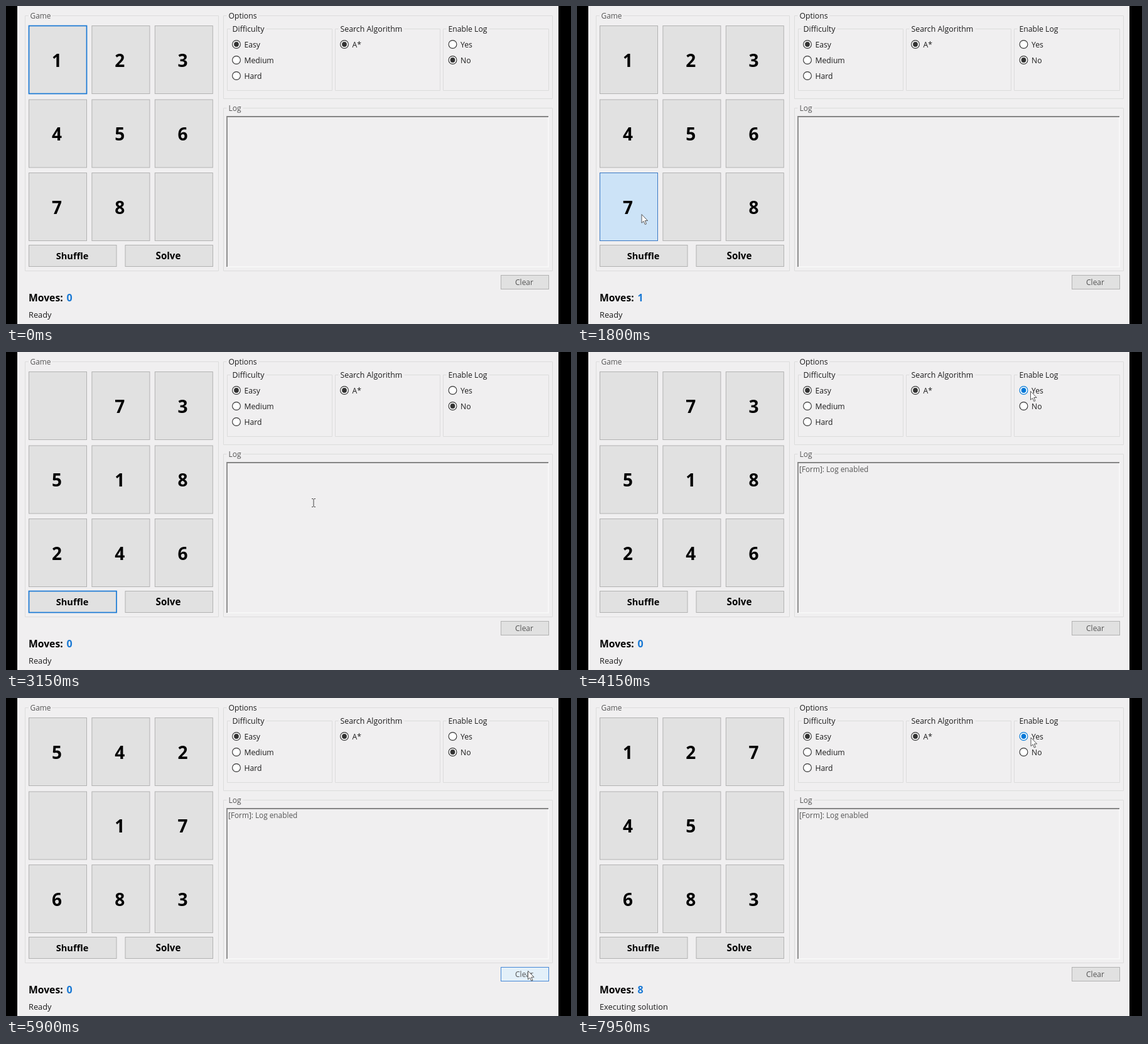
Write an HTML page that moves like this. It is 900 px wide and 506 px high and loops after 8000 ms.

```html
<!DOCTYPE html>
<html lang="en">
<head>
<meta charset="utf-8">
<title>Sliding puzzle</title>
<style>
  html, body { margin: 0; width: 100%; height: 100%; overflow: hidden; background: #000; }
  svg { display: block; width: 100%; height: 100%; }
  text { font-family: "Open Sans", "Noto Sans", sans-serif; fill: #1c1c1c; }
  .bold { font-weight: 700; fill: #000; }
  .soft { fill: #555; }
  .mid { text-anchor: middle; }
</style>
</head>
<body>
<svg id="stage" viewBox="0 0 900 506"></svg>
<script>
const LOOP = 8000, STEP = 50;
const BLUE = '#1878d4', INK = '#333';
const stage = document.getElementById('stage');

function el(tag, attrs, content) {
  const node = document.createElementNS('http://www.w3.org/2000/svg', tag);
  set(node, attrs);
  if (content !== undefined) node.textContent = content;
  return stage.appendChild(node);
}
function set(node, attrs) {
  for (const key in attrs) node.setAttribute(key, attrs[key]);
}
function label(x, y, size, content, cls = '') {
  return el('text', { x, y, 'font-size': size, class: cls }, content);
}
function group(x, y, right, bottom, title, titleWidth, size, cls) {
  const from = x + 5, to = x + 11 + titleWidth;
  el('path', {
    d: `M${from} ${y}H${x}V${bottom}H${right}V${y}H${to}`,
    fill: 'none', stroke: '#dcdcdc'
  });
  label(x + 8, y + 4.5, size, title, cls);
}

// Controls keep their box for hit tests
const controls = {};
function button(id, x, y, w, h, title, size, textX, baseline, cls) {
  const box = el('rect', { x: x + 0.5, y: y + 0.5, width: w - 1, height: h - 1 });
  const text = label(textX, baseline, size, title, cls + ' mid');
  controls[id] = { x, y, w, h, box, text };
}
function radio(id, x, y, title, size) {
  const ring = el('circle', { cx: x, cy: y, r: 6.4, 'stroke-width': 1.1 });
  const dot = el('circle', { cx: x, cy: y, r: 3.9 });
  label(x + 12.5, y + 4.6, size, title);
  controls[id] = { x: x - 8, y: y - 8, w: 42, h: 16, ring, dot };
}

el('rect', { width: 900, height: 506, fill: '#000' });
el('rect', { x: 18, width: 862, height: 506, fill: '#f0eff0' });

group(30.5, 15.5, 338.5, 421.5, 'Game', 32, 11.9, 'soft');
group(346.5, 15.5, 870.5, 147.5, 'Options', 45, 12.2, '');
group(352.5, 36.5, 519.5, 134.5, 'Difficulty', 51, 12.4, '');
group(524.5, 36.5, 691.5, 134.5, 'Search Algorithm', 99, 12.35, '');
group(696.5, 36.5, 864.5, 134.5, 'Enable Log', 62, 12.2, '');
group(346.5, 162.5, 870.5, 421.5, 'Log', 20, 12, 'soft');

el('path', { d: 'M864 176V415H352', fill: 'none', stroke: '#fafafa', 'stroke-width': 1.5 });
el('path', { d: 'M864 176H352V415', fill: 'none', stroke: '#858585', 'stroke-width': 1.8 });
const logLine = label(354, 190.5, 11.8, '[Form]: Log enabled', 'soft');

const rows = [[31, 97], [148.5, 214], [265, 331]];
for (let i = 0; i < 9; i++) {
  const col = i % 3, [top, base] = rows[(i - col) / 3];
  button('t' + i, 36 + col * 100.4, top, 93, 109, '', 28, 81 + col * 100.2, base, 'bold');
}
button('shuffle', 36, 380, 140.5, 35, 'Shuffle', 14.6, 105.5, 403, 'bold');
button('solve', 189.5, 380, 140.5, 35, 'Solve', 15.1, 258.5, 403, 'bold');
button('clear', 788, 428, 77, 23, 'Clear', 12, 825.5, 444, 'soft');

radio('easy', 367, 61, 'Easy', 12.2);
radio('medium', 367, 86, 'Medium', 12.2);
radio('hard', 367, 111, 'Hard', 12.2);
radio('astar', 539, 61, 'A*', 12.2);
radio('yes', 711.5, 61, 'Yes', 12.2);
radio('no', 711.5, 86, 'No', 12.2);

label(36, 469.5, 15.7, 'Moves:', 'bold');
const counter = label(101, 469.5, 16, '0', 'bold mid');
counter.style.fill = BLUE;
const status = label(36, 496, 12.8, 'Ready');

const arrow = el('path', {
  d: 'M0 0V13.6L3.1 10.8 5.4 16 7.5 15.1 5.3 10H9.6Z',
  fill: '#fff', stroke: '#444', 'stroke-width': 0.9, 'stroke-linejoin': 'round'
});
const beam = el('path', {
  d: 'M-3 -6.5H-1L0 -5.5 1 -6.5H3M0 -5.5V5.5M-3 6.5H-1L0 5.5 1 6.5H3',
  fill: 'none', stroke: '#444', 'stroke-width': 1
});

// Pointer stops: time, x, y
const path = [
  [700, 299, 446], [800, 299, 446], [1100, 184, 346], [1250, 181, 350], [1450, 178, 346],
  [1750, 104, 335], [1900, 100, 322], [2100, 104, 230], [2350, 111, 238],
  [2600, 138, 394], [2800, 142, 397], [3150, 490, 240], [3250, 505, 232],
  [3400, 505, 232], [3700, 825, 14], [3950, 724, 64], [4250, 722, 62],
  [4650, 149, 397], [4800, 151, 399], [4880, 152, 399], [5100, 852, 130],
  [5400, 724, 86], [5600, 722, 85], [5850, 832, 434], [6080, 828, 436],
  [6550, 243, 398], [6950, 239, 394], [7100, 240, 394], [7400, 811, 112],
  [7650, 726, 60], [7950, 723, 63], [8000, 723, 63]
];
// Presses: down, up, control
const clicks = [
  [1200, 1400, 't7'], [1800, 1900, 't6'], [2100, 2200, 't3'],
  [2650, 2750, 'shuffle'], [3950, 4050, 'yes'], [4750, 4850, 'shuffle'],
  [5450, 5550, 'no'], [5950, 6050, 'clear'], [6650, 6800, 'solve'],
  [7700, 7800, 'yes']
];
const SOLVE_AT = 6810, MOVE_MS = 157, SOLUTION = 'RULDRURD';
const SHUFFLES = ['073518246', '542017683'];
const DELTA = { U: -3, D: 3, L: -1, R: 1 };

function pointer(t) {
  if (t < path[0][0]) return null;
  const i = path.findIndex(p => p[0] > t);
  const [t0, x0, y0] = path[i - 1], [t1, x1, y1] = path[i];
  const u = (t - t0) / (t1 - t0), e = u * u * (3 - 2 * u);
  return { x: x0 + (x1 - x0) * e, y: y0 + (y1 - y0) * e };
}
function slide(board, cell) {
  board[board.indexOf('0')] = board[cell];
  board[cell] = '0';
}
function stateAt(t) {
  const s = { board: [...'123456780'], moves: 0, log: false, text: false, focus: 't0', pressed: null };
  let shuffles = 0;
  for (const [down, up, id] of clicks) {
    if (t < down) break;
    s.focus = id;
    if (t < up) { s.pressed = id; break; }
    if (id[0] === 't') { slide(s.board, +id[1]); s.moves++; }
    if (id === 'shuffle') { s.board = [...SHUFFLES[shuffles++]]; s.moves = 0; }
    if (id === 'yes') s.log = s.text = true;
    if (id === 'no') s.log = false;
    if (id === 'clear') s.text = false;
  }
  if (t >= SOLVE_AT) {
    s.moves = Math.min(SOLUTION.length, Math.floor((t - SOLVE_AT) / MOVE_MS) + 1);
    for (const dir of SOLUTION.slice(0, s.moves)) {
      slide(s.board, s.board.indexOf('0') + DELTA[dir]);
    }
  }
  return s;
}
function show(node, on) {
  node.setAttribute('visibility', on ? 'visible' : 'hidden');
}

function draw(t) {
  const s = stateAt(t), p = pointer(t);
  const over = c => p && p.x >= c.x && p.x < c.x + c.w && p.y >= c.y && p.y < c.y + c.h;
  const chosen = { easy: true, astar: true, yes: s.log, no: !s.log };

  for (const id in controls) {
    const c = controls[id], hover = over(c), down = s.pressed === id;
    if (c.box) {
      const focus = s.focus === id && !hover && !down;
      set(c.box, {
        fill: down ? '#cce3f7' : hover ? '#e3f0f9' : '#e1e1e1',
        stroke: down ? '#3a78c3' : hover ? '#4587d6' : focus ? BLUE : '#b2b2b2',
        'stroke-width': focus ? 1.7 : 1
      });
    } else {
      const color = hover || down ? '#0078d7' : INK;
      set(c.ring, { fill: down ? '#cce4f7' : '#fff', stroke: color });
      set(c.dot, { fill: color });
      show(c.dot, chosen[id]);
    }
  }
  s.board.forEach((n, i) => { controls['t' + i].text.textContent = n === '0' ? '' : n; });
  counter.textContent = s.moves;
  status.textContent = t >= SOLVE_AT ? 'Executing solution' : 'Ready';
  show(logLine, s.text);

  const inLog = over({ x: 352, y: 176, w: 512, h: 239 });
  show(arrow, p && !inLog);
  show(beam, inLog);
  if (p) set(inLog ? beam : arrow, { transform: `translate(${p.x.toFixed(1)} ${p.y.toFixed(1)})` });
}

const start = performance.now();
function tick() {
  const t = (performance.now() - start) % LOOP;
  draw(Math.floor(t / STEP) * STEP);
  requestAnimationFrame(tick);
}
tick();
</script>
</body>
</html>
```
